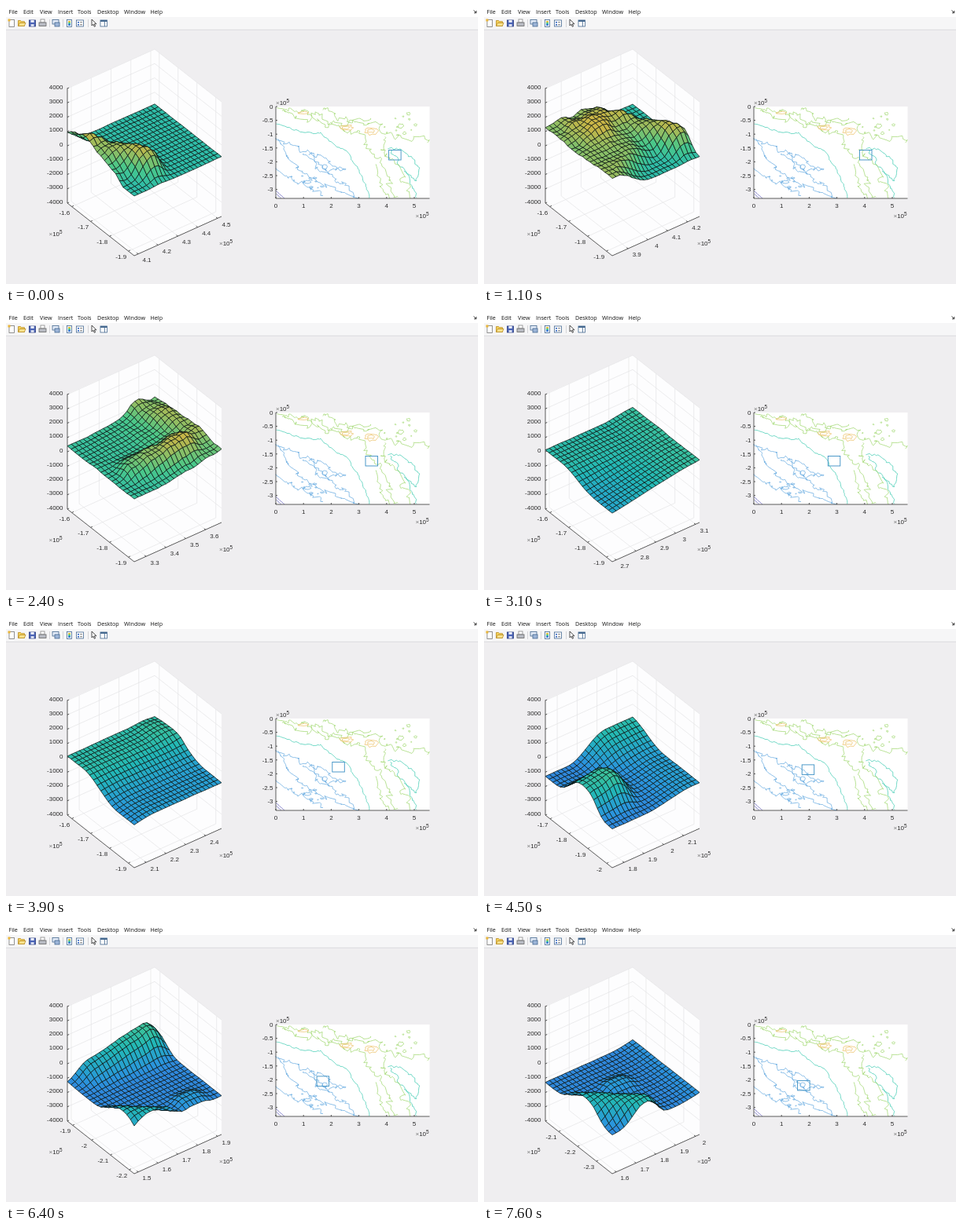
An HTML page that plays this animation: 600x354 px, repeating every 8 s.

```html
<!DOCTYPE html>
<html lang="en">
<head>
<meta charset="utf-8">
<title>Terrain window</title>
<style>
html, body { margin: 0; width: 100%; height: 100%; overflow: hidden; background: #efeef0; }
svg { display: block; width: 600px; height: 354px; }
text { font-family: "Liberation Sans", Arial, sans-serif; font-size: 8px; fill: #2a2a2a; }
#menu text { font-family: "Open Sans", sans-serif; font-size: 7.2px; fill: #111; }
.line { fill: none; stroke: #333; stroke-width: .8; }
.grid { fill: none; stroke: #e4e4e6; stroke-width: .7; }
.mid { text-anchor: middle; }
.end { text-anchor: end; }
#mesh path { stroke: #0b1512; stroke-width: .75; stroke-linejoin: round; }
#map path { fill: none; stroke-width: .75; stroke-linejoin: round; }
</style>
</head>
<body>
<svg viewBox="0 0 600 354">
  <rect width="600" height="354" fill="#efeef0"/>
  <rect width="600" height="14" fill="#fff"/>
  <rect y="14" width="600" height="16" fill="#f6f6f7"/>
  <path d="M0 30.3H600" stroke="#d5d5d7" stroke-width=".7"/>
  <path d="M594.5 5.5l3 3m.3-2.5v2.8h-2.8" fill="none" stroke="#222" stroke-width=".9"/>
  <g id="menu"></g>
  <g id="tools" stroke-width=".8"></g>
  <path d="M78 104.5L189 55L274 122V268L163 318L78 251Z" fill="#fdfdfe"/>
  <path class="grid" id="grid"/>
  <path class="line" id="axes"/>
  <g id="mesh"></g>
  <g id="labels"></g>
  <g id="ticks"></g>
  <rect x="343" y="128" width="195.5" height="117" fill="#fff"/>
  <g id="map"></g>
  <path class="line" id="mapAxes"/>
  <rect id="box" width="15.5" height="12.5" fill="none" stroke="#3a8fc4" stroke-width=".9"/>
</svg>
<script>
const $ = id => document.getElementById(id);
const NX = 22, NY = 18, DX = 0.02, DY = 0.0197;
const W = NX * DX, H = NY * DY;
const SCALE = 35.2, LEFT = 343, TOP = 128;

function add(parent, tag, attrs, text) {
  const el = document.createElementNS("http://www.w3.org/2000/svg", tag);
  for (const k in attrs) el.setAttribute(k, attrs[k]);
  if (text !== undefined) el.textContent = text;
  parent.appendChild(el);
  return el;
}

const clamp = (v, a, b) => Math.max(a, Math.min(b, v));
const lerp = (a, b, k) => a + (b - a) * k;
const ease = k => k * k * (3 - 2 * k);
const rise = (a, b, v) => ease(clamp((v - a) / (b - a), 0, 1));
const fix = v => v.toFixed(1);
const seg = pts => "M" + pts.map(p => p.map(fix).join(" ")).join("L");

function hash(i, j) {
  const s = Math.sin(i * 127.1 + j * 311.7) * 43758.5453;
  return s - Math.floor(s);
}

// Smooth noise in -0.5 .. 0.5
function noise(x, y) {
  const i = Math.floor(x), j = Math.floor(y), u = ease(x - i);
  const row = n => lerp(hash(i, n), hash(i + 1, n), u);
  return lerp(row(j), row(j + 1), ease(y - j)) - .5;
}

// Terrain: a smooth profile from sea to highland to plain, with ridges on it
const ridge = (from, to, radius, z1, z2) => ({ from, to, radius, z1, z2 });
const ridges = [
  ridge([4.06, -1.64], [4.22, -1.84], .06, 1500, 1600),
  ridge([3.92, -1.66], [3.97, -1.68], .06, 1750, 1950),
  ridge([3.6, -1.59], [3.68, -1.8], .06, 1300, 1450),
  ridge([3.35, -1.81], [3.57, -1.84], .055, 1150, 1850),
  ridge([2.42, -1.63], [2.49, -1.66], .06, 320, 260),
  ridge([1.6, -1.86], [1.85, -1.88], .083, -350, 480),
  ridge([1.43, -2.12], [1.75, -2.36], .068, -320, 60),
  ridge([1.77, -2.19], [1.82, -2.19], .045, -900, -900)
];

function ground(x, y) {
  const plainX = x + .16 * rise(-1.82, -1.92, y);
  const z = -1300 + 500 * rise(1.9, 2.15, x) + 1200 * rise(2.5, 3.2, x)
    + 900 * rise(3.3, 3.85, x) - 1130 * rise(4, 4.17, plainX);
  const shelf = rise(-1.84, -1.66, y) * rise(1.85, 2.05, x);
  return lerp(z, Math.max(z, 130), shelf);
}

function height(i, j) {
  const x = i * DX, y = -j * DY;
  let z = ground(x, y), rough = 0;
  for (const { from: [ax, ay], to: [bx, by], radius, z1, z2 } of ridges) {
    const dx = bx - ax, dy = by - ay;
    const k = clamp(((x - ax) * dx + (y - ay) * dy) / (dx * dx + dy * dy), 0, 1);
    const d = Math.hypot(x - ax - k * dx, y - ay - k * dy) / radius;
    const w = Math.exp(-Math.pow(d, 3));
    z = lerp(z, lerp(z1, z2, k), w);
    rough += 90 * w;
  }
  rough += clamp(z * .22, 25, 330);
  return z + rough * (noise(i / 2.5, j / 2.5) + .3 * (hash(i, j) - .5));
}

// Blue for low ground through teal to ochre
const ramp = [0x3b2fa0, 0x3a68dc, 0x2a96dc, 0x22b8b6, 0x4cc888, 0xc4b648, 0xeebc40];
const channels = c => [c >> 16, c >> 8 & 255, c & 255];
function colour(z) {
  const v = clamp((z + 2850) / 5500, 0, .999) * (ramp.length - 1), n = Math.floor(v);
  const next = channels(ramp[n + 1]);
  return "rgb(" + channels(ramp[n]).map((c, i) => Math.round(lerp(c, next[i], v - n))) + ")";
}

// u runs west to east, v north to south
const project = (u, v, z) => [78 + 85 * v + 111 * u, 251 + 67 * v - 50 * u - (z + 4000) * .01825];

// Where the window stands after some steps: [step, column, row]
const route = [[0, 204, 80], [7, 191, 80], [15, 162, 80], [30, 102, 80], [43, 70, 91], [55, 74, 95], [67, 79, 103]];
const bursts = [[300, 3], [800, 4], [1400, 3], [2000, 57]];
const stepAt = t => bursts.reduce((n, [start, count]) => n + clamp(Math.floor((t - start) / 100) + 1, 0, count), 0);

function place(step) {
  const n = Math.max(1, route.findIndex(r => r[0] >= step));
  const [s, i, j] = route[n - 1], [s2, i2, j2] = route[n];
  const k = (step - s) / (s2 - s);
  return [Math.round(lerp(i, i2, k)), Math.round(lerp(j, j2, k))];
}

function buildBars() {
  const starts = { File: 3.5, Edit: 22, View: 43, Insert: 66, Tools: 91, Desktop: 116, Window: 150, Help: 183.5 };
  for (const name in starts) add($("menu"), "text", { x: starts[name], y: 9.7 }, name);

  const rect = (x, y, width, height, fill, stroke = "none") => add($("tools"), "rect", { x, y, width, height, fill, stroke });
  const path = (d, fill, stroke) => add($("tools"), "path", { d, fill, stroke });
  const edge = "#44688f";
  rect(4, 17.5, 6.5, 9, "#fff", "#777");
  rect(2.5, 16.5, 3, 3, "#e9b63a");
  path("M15.5 25.5v-7h3l1 1.2h4v5.8z", "#f3cf58", "#b98f26");
  path("M15.5 25.5l2-4H25l-1.7 4z", "#fae28d", "#b98f26");
  rect(29.5, 18, 8, 8, "#4a63b5", "#2b3c7e");
  rect(31.4, 18, 4.3, 3, "#e8ecf7");
  rect(31.6, 23.2, 4, 2.6, "#e8ecf7");
  rect(44, 17, 5, 4, "#fff", "#888");
  rect(42, 21, 9, 4.5, "#b9bcc4", "#666");
  rect(59, 17.5, 8, 5.5, "#e4ecf8", edge);
  rect(62, 21, 6, 5, "#9db5d8", edge);
  rect(77.5, 17.5, 6, 9, "#fff", edge);
  ["#e2c343", "#4bc59d", "#3e7cd8"].forEach((c, n) => rect(79, 19 + 2 * n, 3, 2, c));
  rect(89.5, 18, 9, 8, "#fff", edge);
  for (const y of [20, 23]) { rect(91, y, 2, 1.6, "#3569c4"); rect(94, y + .4, 3, .8, "#555"); }
  path("M109 17v8l2-1.7 1.3 3 1.3-.6-1.3-2.9h2.7z", "#fff", "#222");
  rect(120, 18, 8.5, 8, "#fff", edge);
  rect(120, 18, 8.5, 2, edge);
  rect(125.2, 20, .8, 6, edge);
  for (const x of [55, 72, 104]) rect(x, 17, .7, 10, "#c8c8ca");
}

function power(x, y) {
  const el = add($("labels"), "text", { x, y });
  add(el, "tspan", { fill: "#777" }, "×");
  add(el, "tspan", {}, "10");
  add(el, "tspan", { dy: -3, "font-size": 6.4 }, "5");
}

function buildAxes() {
  let d = "M78 104.5V251L163 318L274 268";
  for (let z = -4000; z <= 4000; z += 1000) {
    const y = project(0, 0, z)[1];
    add($("labels"), "text", { x: 72.5, y: y + .6, class: "end" }, z);
    d += `M78 ${y}l2.2 -1`;
  }
  $("axes").setAttribute("d", d);

  d = "M343 128V245H538.5";
  for (let n = 0; n <= 6; n++) {
    const x = LEFT + n * SCALE, y = TOP + n * SCALE / 2;
    d += `M343 ${y}h2`;
    add($("labels"), "text", { x: 339.5, y: y + 2.8, class: "end" }, n ? -n / 2 : 0);
    if (n === 6) break;
    d += `M${x} 245v-2`;
    add($("labels"), "text", { x, y: 256.8, class: "mid" }, n);
  }
  $("mapAxes").setAttribute("d", d);
  power(54.5, 293);
  power(271, 305);
  power(343, 125.8);
  power(520.5, 270);
}

// Contour that wanders around a few points
let seed = 0;
function contour(stroke, wander, ...pts) {
  const line = [], row = 17 * ++seed;
  let s = 0;
  const shift = n => wander * (noise(s / 9, row + n) + .6 * noise(s / 2.6, row + n));
  for (let n = 1; n < pts.length; n++) {
    const [ax, ay] = pts[n - 1], [bx, by] = pts[n];
    const length = Math.hypot(bx - ax, by - ay);
    for (let k = 0; k < length; k += 1.3, s += 1.3) {
      const x = lerp(ax, bx, k / length) + shift(0), y = lerp(ay, by, k / length) + shift(5);
      line.push([clamp(x, LEFT, 538), clamp(y, TOP, 245)]);
    }
  }
  add($("map"), "path", { d: seg(line), stroke });
}

function ring(stroke, cx, cy, rx, ry) {
  const line = [], row = ++seed;
  for (let k = 0; k < 14; k++) {
    const a = k * Math.PI / 7, r = 1 + .6 * (hash(k, row) - .5);
    line.push([clamp(cx + rx * r * Math.cos(a), LEFT, 538), cy + ry * r * Math.sin(a)]);
  }
  add($("map"), "path", { d: seg(line) + "Z", stroke });
}

function buildMap() {
  const lime = "#a2d872", teal = "#3fcbb2", blue = "#68abe0", deep = "#5b57b8", gold = "#ecc26a";
  contour(teal, 3, [343, 150], [375, 161], [400, 162], [434, 187], [453, 216], [463, 245]);
  contour(teal, 4, [488, 181], [511, 187], [527, 208], [522, 222], [503, 206], [488, 181]);
  contour(teal, 4, [507, 211], [522, 245]);
  contour(lime, 9, [343, 131], [385, 134], [412, 147], [475, 152], [485, 162], [538, 171]);
  contour(lime, 9, [347, 135], [398, 148], [450, 160], [470, 191], [488, 224], [494, 245]);
  contour(lime, 9, [478, 160], [483, 190], [505, 220], [513, 245]);
  contour(lime, 8, [400, 128], [430, 146], [466, 146]);
  contour(lime, 8, [468, 205], [486, 245]);
  contour(blue, 8, [343, 167], [385, 184], [428, 228], [446, 243]);
  contour(blue, 9, [349, 171], [368, 203], [400, 224], [436, 243]);
  contour(blue, 9, [343, 212], [384, 228], [404, 243]);
  contour(blue, 8, [380, 186], [430, 210], [400, 212], [380, 186]);
  for (const y of [235, 239]) contour(deep, 1, [343, y], [354 - (y - 235), 245]);
  ring(blue, 405, 205, 3, 2.6);
  ring(gold, 378, 136, 6, 1.6);
  for (const k of [1, .5]) {
    ring(gold, 432, 155, 9 * k, 3.4 * k);
    ring(gold, 464, 159, 8 * k, 4.6 * k);
  }
  // Scattered islands
  for (let n = 0; n < 12; n++) {
    const a = hash(n, 3), b = hash(n, 8), size = .6 + 2.6 * hash(n, 5) ** 2;
    ring(lime, 478 + 56 * a, 133 + 34 * b, size * 1.3, size);
    ring(blue, 360 + 55 * a, 205 + 20 * a + 18 * b, size * 1.4, size * .6);
  }
}

const quads = Array.from({ length: NX * NY }, () => add($("mesh"), "path", {}));

function drawMesh(i0, j0) {
  const pts = [], zs = [];
  for (let j = 0; j <= NY; j++) for (let i = 0; i <= NX; i++) {
    const z = height(i0 + i, j0 + j);
    zs.push(z);
    pts.push(project(i / NX, j / NY, z));
  }
  let n = 0;
  for (let j = 0; j < NY; j++) for (let i = NX - 1; i >= 0; i--) {
    const a = j * (NX + 1) + i, c = a + NX + 1, q = quads[n++];
    q.setAttribute("d", seg([pts[a], pts[a + 1], pts[c + 1], pts[c]]) + "Z");
    q.setAttribute("fill", colour((zs[a] + zs[a + 1] + zs[c] + zs[c + 1]) / 4));
  }
}

function drawTicks(x0, y0) {
  const group = $("ticks");
  group.textContent = "";
  let grid = "", marks = "";
  for (let z = -3000; z <= 4000; z += 1000) grid += seg([project(0, 0, z), project(1, 0, z), project(1, 1, z)]);

  function tick(k, at, wall, mark, dx, dy) {
    const p = project(...at, -4000);
    grid += seg([p, project(...wall, -4000), project(...wall, 4000)]);
    marks += seg([p, [p[0] + mark, p[1] - 1.3]]);
    add(group, "text", { x: fix(p[0] + dx), y: fix(p[1] + dy), class: "mid" }, String(k / 10));
  }
  for (let k = Math.ceil(x0 * 10 - 1e-6); k / 10 <= x0 + W; k++) {
    const u = (k / 10 - x0) / W;
    tick(k, [u, 1], [u, 0], -2, 11, 10.4);
  }
  for (let k = Math.floor(y0 * 10 + 1e-6); k / 10 >= y0 - H; k--) {
    const v = (y0 - k / 10) / H;
    tick(k, [0, v], [1, v], 2.2, -9.5, 10);
  }
  $("grid").setAttribute("d", grid);
  add(group, "path", { d: marks, class: "line" });
}

function draw(step) {
  const [i0, j0] = place(step);
  const x0 = i0 * DX, y0 = -j0 * DY;
  drawTicks(x0, y0);
  drawMesh(i0, j0);
  $("box").setAttribute("x", fix(LEFT + x0 * SCALE));
  $("box").setAttribute("y", fix(TOP - y0 * SCALE));
}

buildBars();
buildAxes();
buildMap();
const begin = performance.now();
let shown = -1;
function frame() {
  const step = stepAt((performance.now() - begin) % 8000);
  if (step !== shown) draw(shown = step);
  requestAnimationFrame(frame);
}
frame();
</script>
</body>
</html>
```
